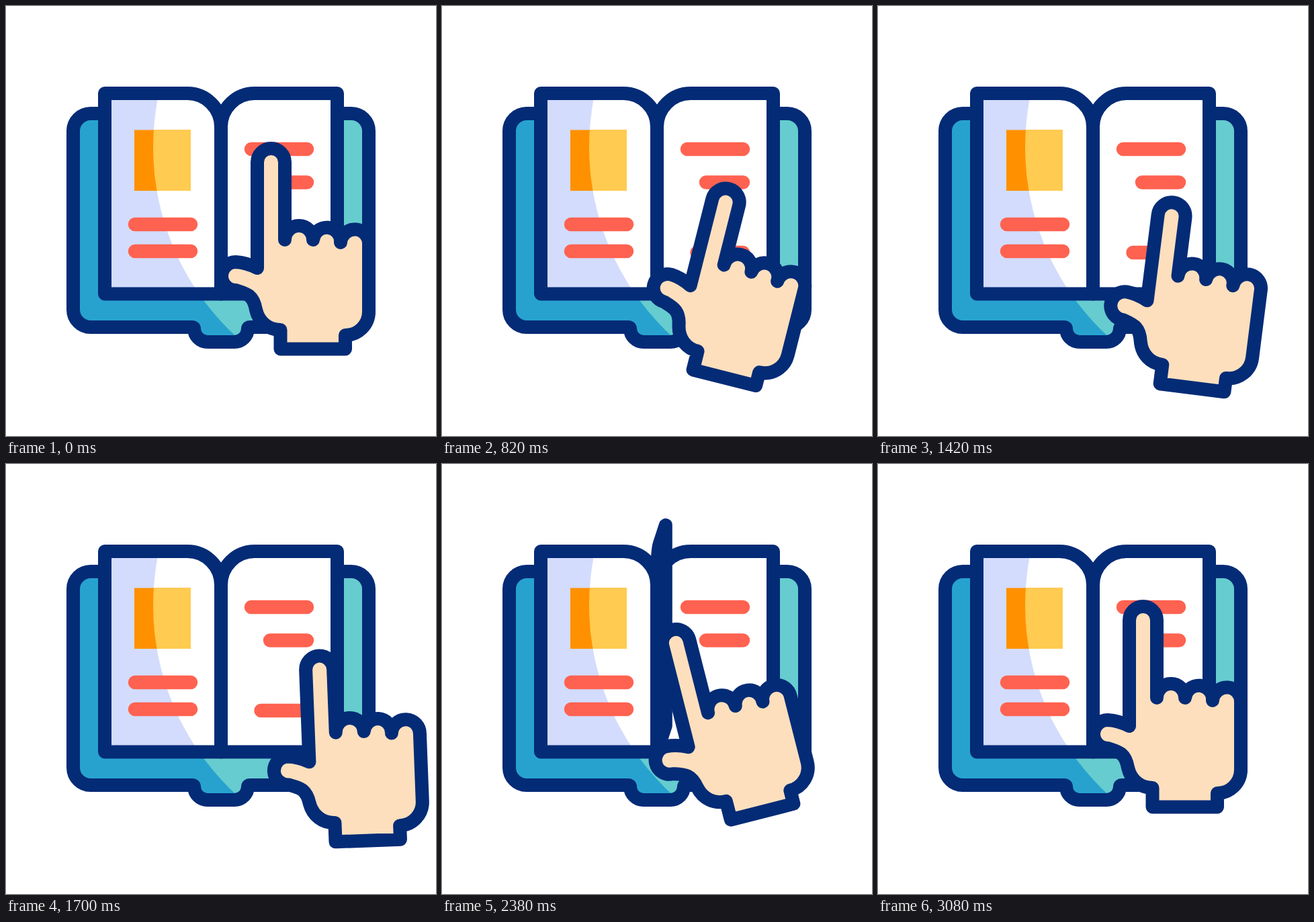
Write an HTML page that moves like this. It is 640 px wide and 640 px high and loops after 3.6 s.

```html
<!DOCTYPE html>
<html lang="en">
<head>
<meta charset="utf-8">
<title>Reading a book</title>
<style>
html, body { margin: 0; height: 100%; overflow: hidden; background: #fff; }
svg { display: block; width: 100vw; height: 100vh; }
.ink { fill: none; stroke: #042b76; stroke-width: 20; stroke-linejoin: round; }
.text { fill: none; stroke: #ff6250; stroke-width: 20.5; stroke-linecap: round; }
.lit { clip-path: url(#light); }
#hand { fill: #fddfbd; }
</style>
</head>
<body>
<svg viewBox="0 0 640 640">
  <defs>
    <clipPath id="light"><circle cx="603" cy="210" r="384"/></clipPath>
    <path id="cover" d="M147 160H126A26 26 0 0 0 100 186V452A26 26 0 0 0 126 478H277Q280 478 280 480A20 20 0 0 0 300 500H340A20 20 0 0 0 360 480Q360 478 363 478H514A26 26 0 0 0 540 452V186A26 26 0 0 0 514 160H493Z"/>
    <path id="leftEdge"/>
    <path id="rightEdge"/>
    <path id="picture" d="M191 184.5H275V275H191Z"/>
    <g id="left">
      <use href="#leftEdge" fill="#d3dcfc"/>
      <g class="lit"><use href="#leftEdge" fill="#fff"/></g>
      <use href="#picture" fill="#ff9100"/>
      <g class="lit"><use href="#picture" fill="#ffcb50"/></g>
      <path class="text" d="M192 325H275M192 365H275"/>
    </g>
    <g id="right">
      <use href="#rightEdge" fill="#fff"/>
      <path class="text" d="M365 213H448M393 262.5H448M379.5 367H448"/>
    </g>
  </defs>
  <use href="#cover" fill="#27a2ce"/>
  <g class="lit"><use href="#cover" fill="#66cccf"/></g>
  <use href="#cover" class="ink"/>
  <use href="#left"/>
  <use href="#right"/>
  <use href="#leftEdge" class="ink"/>
  <use href="#rightEdge" class="ink"/>
  <g id="leaf">
    <use id="leafPrint"/>
    <path id="leafEdge" class="ink"/>
  </g>
  <path id="hand" class="ink"/>
</svg>
<script>
const LOOP = 3600, SPINE = 320, PAGE = 173, LIFT = 39 / PAGE;
const READ_START = 260, ROW_TIME = 460, ROWS = 3;
const FLIP_START = 2187, FLIP_TIME = 400;
const el = id => document.getElementById(id);
const set = (id, attrs) => Object.entries(attrs).forEach(([k, v]) => el(id).setAttribute(k, v));
const ease = u => (1 - Math.cos(Math.PI * u)) / 2;

// Hand stops: x and y of the wrist, tilt, finger shortening, finger lean
const stops = [
  { t: READ_START, pose: [457, 511, 0, 0, 0] },
  { t: 1180, pose: [432, 575, -1, 29, 0] },
  { t: 1700, pose: [539, 561, -2.2, 21, 0] },
  { t: 2020, pose: [517, 520, 9, 7.5, 18] },
  { t: 2380, pose: [477, 518, -14.3, 3, 0] },
  { t: 3070, pose: [457, 511, 0, 0, 0] }
];
const SWING = [-20, 0, 15, 5, 0];

// One quick swing to the right and a slower return for each row of text
function swingAt(time) {
  const row = (time - READ_START) / ROW_TIME;
  return row > 0 && row < ROWS ? Math.sin(Math.PI * Math.sqrt(row % 1)) ** 2 : 0;
}

function poseAt(time) {
  const next = stops.findIndex(s => s.t > time);
  if (next < 1) return stops[0].pose;
  const a = stops[next - 1], b = stops[next];
  const u = ease((time - a.t) / (b.t - a.t)), swing = swingAt(time);
  return a.pose.map((v, k) => v + (b.pose[k] - v) * u + SWING[k] * swing);
}

function drawHand(time) {
  const [x, y, tilt, bend, lean] = poseAt(time);
  set('hand', {
    d: `M374 390L${374 + lean} ${232.5 + bend}a20.5 20.5 0 0 1 41 0L415 348` +
      'a21 21 0 0 1 42 0a20.6 20.6 0 0 1 41 4a21 21 0 0 1 42 3V455' +
      'A35 35 0 0 1 505 490V510.5H408.5V482C390 482 376 470 372 452' +
      'C368 430 358 428 342 423A21 21 0 0 1 342 381Q358 382 374 390Z',
    transform: `translate(${x} ${y}) rotate(${tilt}) translate(-457 -511)`
  });
}

// Page outline turned about the spine: 0 lies right, PI lies left
function pageEdge(angle) {
  const p = (d, y) => `${SPINE + d * Math.cos(angle)} ${y - d * LIFT * Math.sin(angle)} `;
  return `M${p(0, 428.5)}L${p(0, 180)}C${p(0, 152.4)}${p(22.4, 130)}${p(50, 130)}` +
    `L${p(PAGE, 130)}L${p(PAGE, 428.5)}Z`;
}

function drawLeaf(time) {
  const u = (time - FLIP_START) / FLIP_TIME;
  const turning = u > 0 && u < 1;
  el('leaf').style.display = turning ? '' : 'none';
  if (!turning) return;
  const angle = Math.PI * ease(u), side = angle < Math.PI / 2 ? 1 : -1;
  const width = Math.abs(Math.cos(angle)), skew = -side * LIFT * Math.sin(angle);
  set('leafEdge', { d: pageEdge(angle) });
  set('leafPrint', {
    href: side > 0 ? '#right' : '#left',
    transform: `matrix(${width} ${skew} 0 1 ${SPINE * (1 - width)} ${-SPINE * skew})`
  });
}

function frame() {
  const time = performance.now() % LOOP;
  drawLeaf(time);
  drawHand(time);
  requestAnimationFrame(frame);
}

set('rightEdge', { d: pageEdge(0) });
set('leftEdge', { d: pageEdge(Math.PI) });
frame();
</script>
</body>
</html>
```
